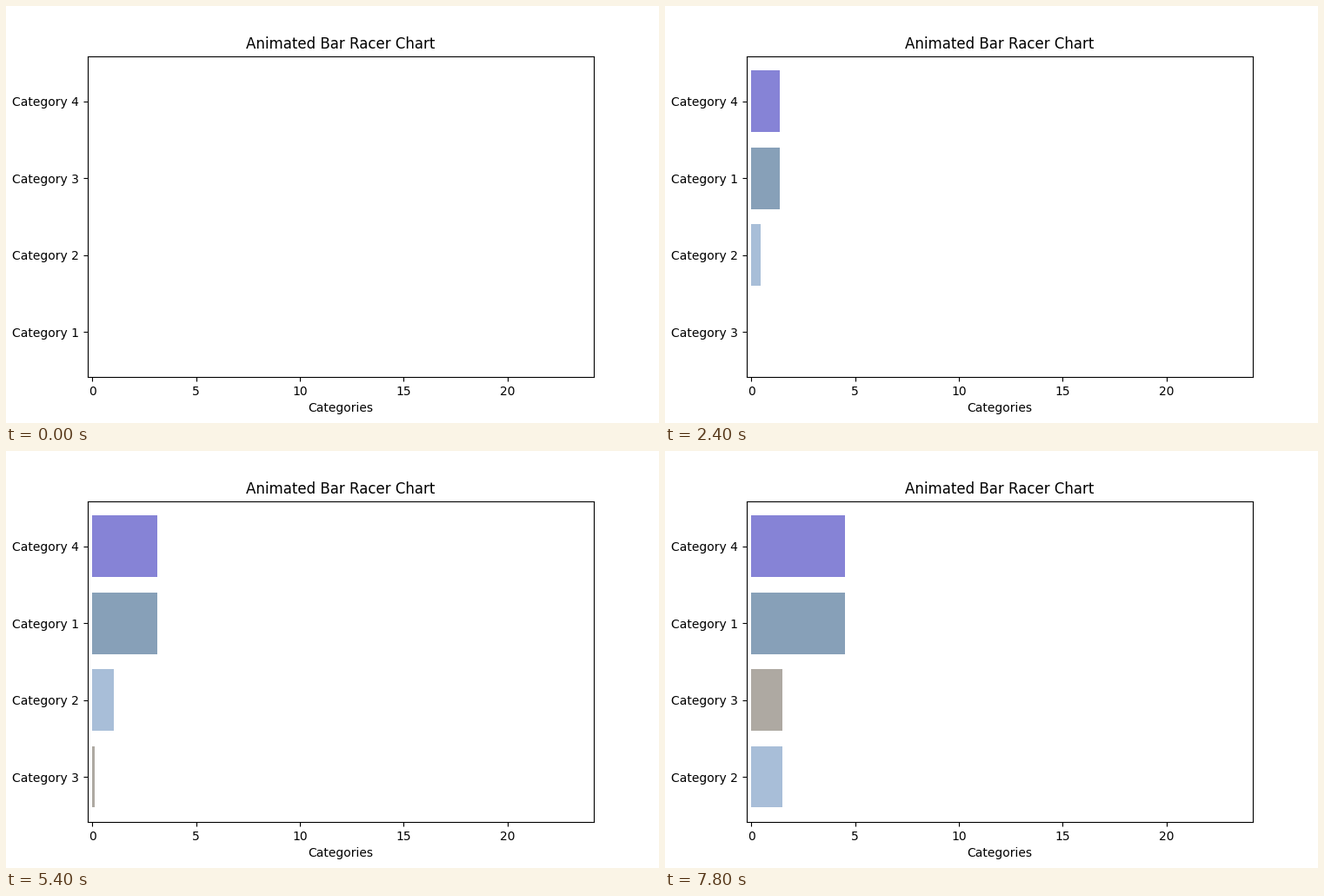
These frames come from a looping animation (751x480 px, 8000 ms). A matplotlib script:

```python
import matplotlib.pyplot as plt
from matplotlib.animation import FuncAnimation

FRAMES = 40
INTERVAL = 200
STEPS = 26          # frames per data interval
TOP = 23            # largest value the axis is made for
BAR = 0.8

# name: (colour, rise per interval, first frame of the rise)
SERIES = {
    "Category 1": ("#87a0b8", 3, 0),
    "Category 2": ("#a8bed8", 1, 0),
    "Category 3": ("#aea9a2", 3, STEPS),
    "Category 4": ("#8683d6", 3, 0),
}

plt.rcParams["font.family"] = "DejaVu Sans"
fig, ax = plt.subplots(figsize=(7.51, 4.8), dpi=100)

names = list(SERIES)
rows = range(len(names))
bars = ax.barh(rows, [0] * len(names), height=BAR,
               color=[SERIES[n][0] for n in names])
ax.set_xlim(-0.01 * TOP, 1.05 * TOP)
ax.set_ylim(-0.59, 3.59)
ax.set_xticks(range(0, 21, 5))
ax.set_yticks(rows, names)
ax.set_title("Animated Bar Racer Chart")
ax.set_xlabel("Categories")


def amount(name, frame):
    """Whole-number progress, so that ties stay exact."""
    _, rise, start = SERIES[name]
    return rise * max(0, frame - start)


def update(frame):
    # Stable sort: equal values keep their listed order.
    order = sorted(names, key=lambda n: amount(n, frame))
    for bar, name in zip(bars, names):
        bar.set_width(amount(name, frame) / STEPS)
        bar.set_y(order.index(name) - BAR / 2)
    ax.set_yticklabels(order)
    return list(bars)


anim = FuncAnimation(fig, update, frames=FRAMES, interval=INTERVAL,
                     init_func=lambda: update(0), repeat=True, repeat_delay=0)
plt.show()
```
